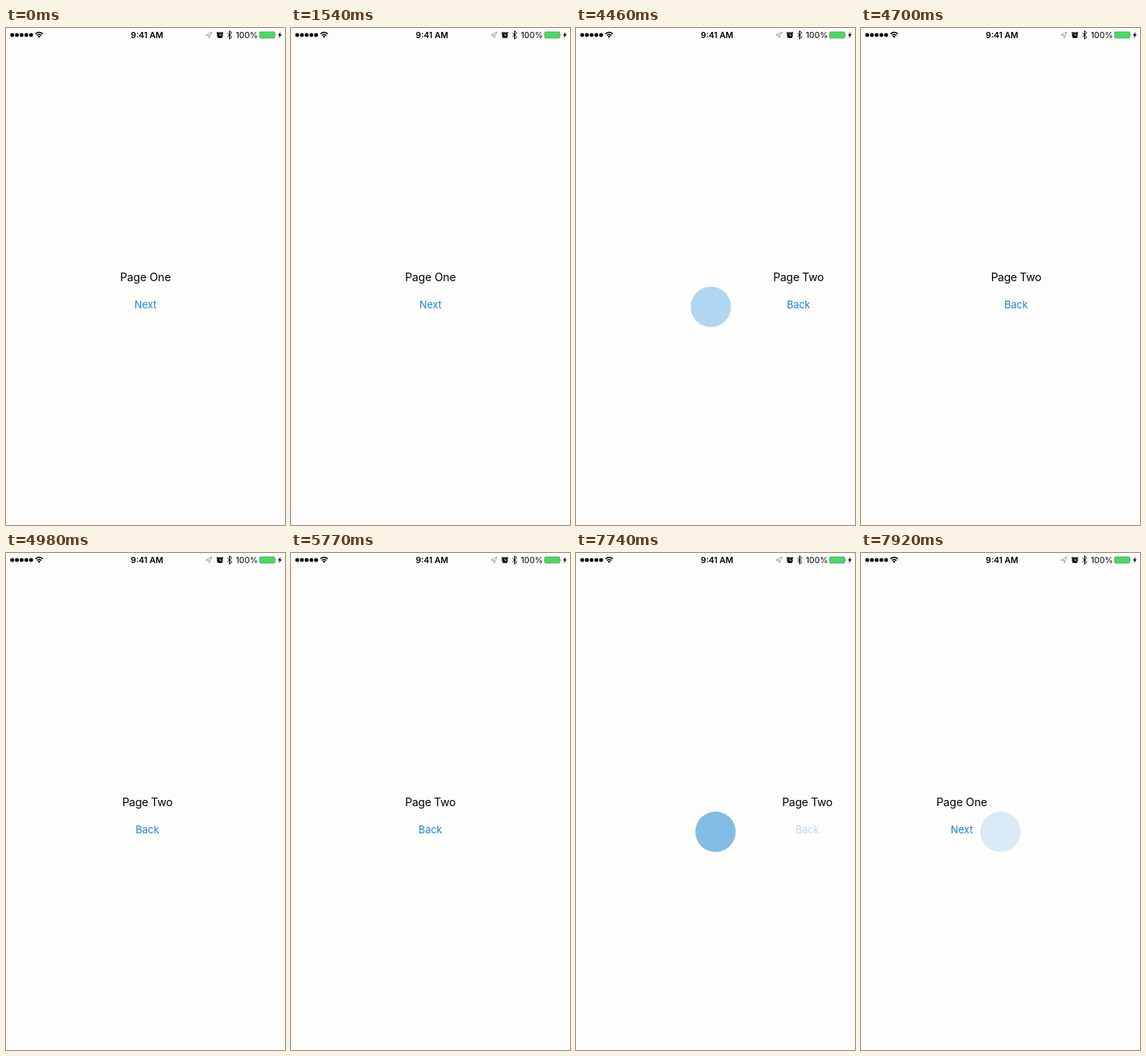
Write an HTML page that moves like this. It is 360 px wide and 640 px high and loops after 8000 ms.

```html
<!DOCTYPE html>
<html lang="en">
<head>
<meta charset="utf-8">
<title>Page slide</title>
<style>
  html, body { margin: 0; width: 100%; height: 100%; overflow: hidden; background: #fdfdfc; }
  svg { display: block; width: 360px; height: 640px; }
  text { font-family: Inter, Roboto, "Liberation Sans", sans-serif; fill: #000; }
  .page { text-anchor: middle; }
  .title { font-size: 14.4px; letter-spacing: -0.1px; }
  #two .title { letter-spacing: -0.27px; }
  .link { font-size: 13px; fill: #1a82da; }
  .clock { font-size: 10.7px; font-weight: 600; text-anchor: middle; }
  .charge { font-size: 10.8px; text-anchor: end; }
  .line { fill: none; stroke: #000; }
</style>
</head>
<body>
<svg viewBox="0 0 360 640">
  <g id="one" class="page">
    <text class="title" x="180" y="325.7">Page One</text>
    <text id="next" class="link" x="180" y="360.8">Next</text>
  </g>
  <g id="two" class="page">
    <text class="title" x="179.8" y="325.7">Page Two</text>
    <text id="back" class="link" x="179.8" y="360.8">Back</text>
  </g>

  <g id="status">
    <circle cx="8" cy="9" r="2.5"/>
    <circle cx="14.1" cy="9" r="2.5"/>
    <circle cx="20.2" cy="9" r="2.5"/>
    <circle cx="26.3" cy="9" r="2.5"/>
    <circle cx="32.4" cy="9" r="2.5"/>
    <path class="line" stroke-width="1.5" d="M38.1 7.6Q42.8 3.4 47.5 7.6M39.9 9.6Q42.8 7 45.7 9.6"/>
    <path d="M42.8 12.7L40.9 10.8Q42.8 9.3 44.7 10.8Z"/>
    <text class="clock" x="182" y="12.9">9:41 AM</text>
    <path class="line" style="stroke:#888" stroke-width=".8" d="M258 9.2L265.8 5L262.2 13L261.8 9.2Z"/>
    <circle cx="276" cy="9.2" r="3.7"/>
    <path class="line" stroke-width="1.1" d="M271.8 7L273.6 5.2M280.2 7L278.4 5.2M273.7 11.8L273 12.8M278.3 11.8L279 12.8"/>
    <path class="line" style="stroke:#fff" stroke-width=".8" d="M276 7V9.5H278"/>
    <path class="line" stroke-width="1" d="M285.8 6.4L291.3 11.6L288.5 14.3V3.7L291.3 6.4L285.8 11.6"/>
    <text class="charge" x="325.1" y="12.9">100%</text>
    <rect x="327.2" y="5" width="19.6" height="8" rx="1.2" fill="#4cd964" stroke="#4a9c58" stroke-width=".8"/>
    <path fill="#333" d="M347.6 7.5Q349 9 347.6 10.5Z"/>
    <path d="M354.6 4.8L350.8 9.6H353L351.8 13.2L355.8 8.2H353.5Z"/>
  </g>

  <circle id="touch" cy="359" fill="rgb(54,149,215)"/>
</svg>
<script>
  const LOOP = 8000, WIDTH = 360;
  const el = id => document.getElementById(id);
  const one = el('one'), two = el('two'), next = el('next'), back = el('back'), touch = el('touch');

  // Times in ms; rate is the decay per second of the distance left
  const push = { press: 4230, slide: 4260, release: 4362, rate: 5.92, x: 174 };
  const pop = { press: 7460, slide: 7686, release: 7740, rate: 7.9, x: 180 };

  const clamp = v => Math.min(1, Math.max(0, v));
  const progress = (tap, t) =>
    t <= tap.slide ? 0 : 1 - Math.exp(-Math.pow(tap.rate * (t - tap.slide) / 1000, 1.1));
  const move = (page, x) => page.setAttribute('transform', `translate(${x.toFixed(2)} 0)`);

  function linkAlpha(tap, t) {
    if (t < tap.press) return 1;
    return 0.28 + 0.72 * clamp((t - tap.release) / 300);
  }

  function drawTouch(tap, t) {
    const arrive = clamp((t - tap.press + 30) / 130);
    const leave = clamp((t - tap.release) / 257);
    const shown = t >= tap.press ? arrive * (1 - leave) : 0;
    touch.setAttribute('cx', tap.x);
    touch.setAttribute('r', 30 - 4 * arrive);
    touch.setAttribute('opacity', 0.62 * shown);
  }

  function draw(t) {
    const shift = WIDTH * (progress(push, t) - progress(pop, t));
    move(one, -shift);
    move(two, WIDTH - shift);
    next.setAttribute('opacity', t < pop.press ? linkAlpha(push, t) : 1);
    back.setAttribute('opacity', linkAlpha(pop, t));
    drawTouch(t < pop.press ? push : pop, t);
  }

  const start = performance.now();
  function tick() {
    draw((performance.now() - start) % LOOP);
    requestAnimationFrame(tick);
  }
  draw(0);
  requestAnimationFrame(tick);
</script>
</body>
</html>
```
